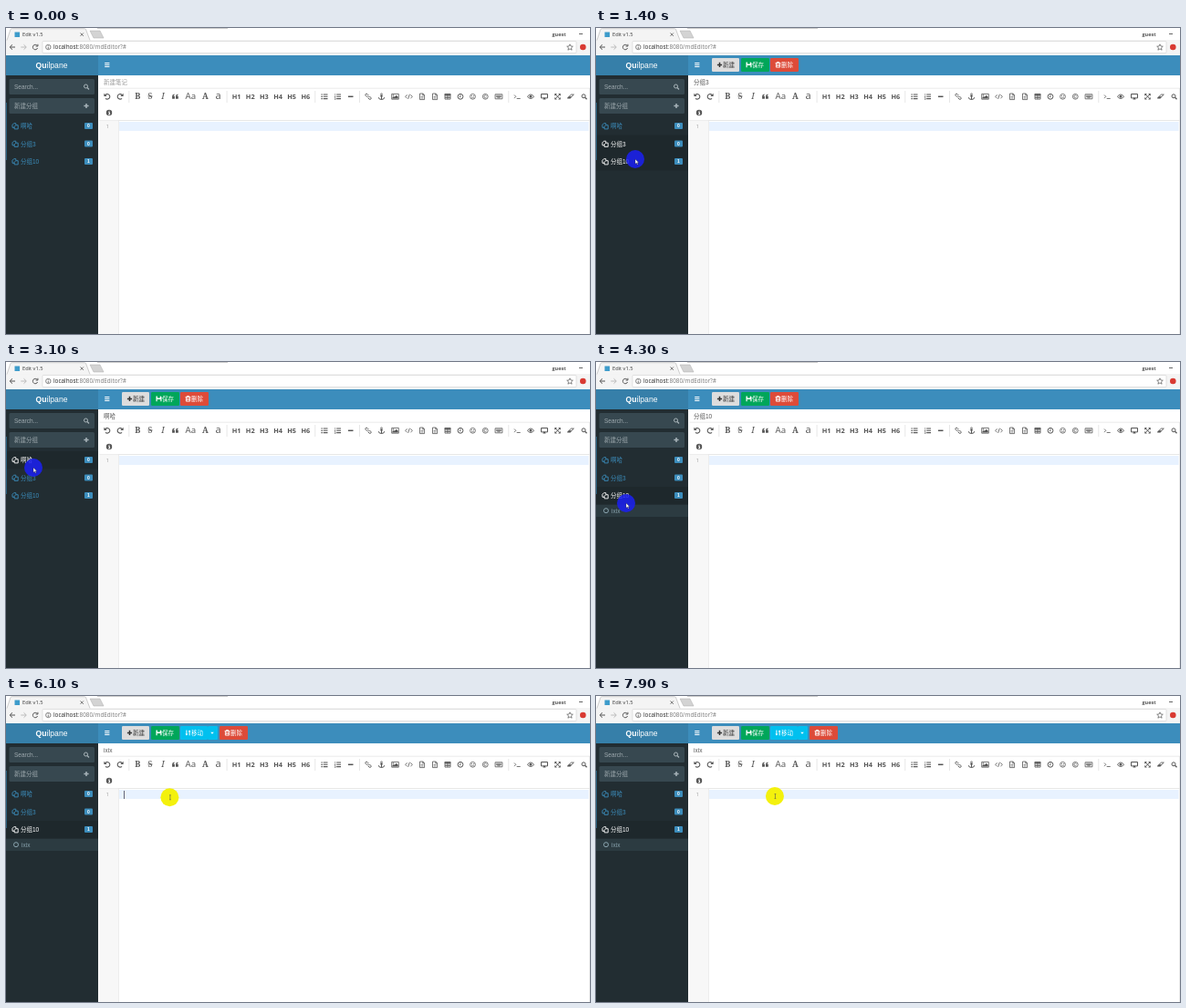
An HTML page for the animation above (8000 ms loop, 640 by 336 pixels).

```html
<!DOCTYPE html>
<html lang="zh-CN">
<head>
<meta charset="utf-8">
<title>Note editor</title>
<style>
html, body { margin: 0; width: 100%; height: 100%; overflow: hidden; background: #fff; }
svg { display: block; width: 100vw; height: 100vh; }
text { font-family: "Open Sans", "Noto Sans CJK SC", "Noto Sans CJK", sans-serif; font-size: 6.5px; }
.ui { font-family: "Liberation Sans", "Noto Sans CJK SC", "Noto Sans CJK", sans-serif; }
.serif { font-family: "Noto Serif", "Liberation Serif", serif; }
.mid { text-anchor: middle; }
.bold { font-weight: 700; }
.line { fill: none; stroke: currentColor; }
</style>
</head>
<body>
<svg id="stage" viewBox="0 0 640 336" xmlns="http://www.w3.org/2000/svg"></svg>
<script>
const LOOP = 8000, STEP = 100;
const TOP = 30, BODY = 52, SIDE = 101, ROW = 19.5;
const stage = document.getElementById('stage');

const rect = (x, y, w, h, fill, more = '') =>
  `<rect x="${x}" y="${y}" width="${w}" height="${h}" fill="${fill}" ${more}/>`;
const text = (x, y, str, fill, more = '') => `<text x="${x}" y="${y}" fill="${fill}" ${more}>${str}</text>`;
const stroke = (d, w = 1) => `<path class="line" d="${d}" stroke-width="${w}"/>`;
const solid = d => `<path d="${d}" fill="currentColor" fill-rule="evenodd"/>`;
const ring = (r, w = 1, x = 0, y = 0) =>
  `<circle class="line" cx="${x}" cy="${y}" r="${r}" stroke-width="${w}"/>`;
const dot = (r, x = 0, y = 0) => `<circle cx="${x}" cy="${y}" r="${r}" fill="currentColor"/>`;

const page = stroke('M-2.5,-3.3H1L2.6,-1.6V3.3H-2.5ZM.8,-3.3V-1.4H2.6', .8) + stroke('M-1.3,0H1.4M-1.3,1.7H1.4', .7);
const undo = stroke('M-2.4,-1.4A2.8 2.8 0 1 1 -2,2', 1.1) + solid('M-3.6,-3.6V-.4H-.4Z');
const bars = stroke('M-1.3,-2.3H3.5M-1.3,0H3.5M-1.3,2.3H3.5', 1.1);

const icons = {
  undo,
  redo: `<g transform="scale(-1 1)">${undo}</g>`,
  quote: solid('M-3.4,-.2Q-3.4,-2.6 -.9,-2.8V-1.8Q-2,-1.6 -1.9,-.6H-.6V2.4H-3.4ZM.5,-.2Q.5,-2.6 3,-2.8V-1.8Q1.9,-1.6 2,-.6H3.3V2.4H.5Z'),
  ul: bars + solid('M-3.6,-2.9h1.4v1.2h-1.4zM-3.6,-.6h1.4v1.2h-1.4zM-3.6,1.7h1.4v1.2h-1.4z'),
  ol: bars + stroke('M-2.8,-3.2V-1.6M-3.5,-.4H-2.4L-3.4,.8H-2.3M-3.4,1.8H-2.4V3.2H-3.4', .6),
  minus: stroke('M-2.8,0H2.8', 1.5),
  link: `<g transform="rotate(45)">${stroke('M-.7,-1.2H-2.7A1.2 1.2 0 0 0 -2.7,1.2H-.7M.7,-1.2H2.7A1.2 1.2 0 0 1 2.7,1.2H.7M-1.2,0H1.2', .9)}</g>`,
  anchor: ring(.9, .8, 0, -2.5) + stroke('M0,-1.6V3.2M-1.6,-.5H1.6M-3.3,.9Q-3,3.2 0,3.2Q3,3.2 3.3,.9', 1),
  image: stroke('M-3.8,-2.9H3.8V2.9H-3.8Z', .8) + solid('M-3.2,2.3V1.2L-1.6,-.4L-.7,.5L1.3,-1.5L3.2,.5V2.3Z') + dot(.7, -2.1, -1.4),
  code: stroke('M-2,-2L-3.8,0L-2,2M2,-2L3.8,0L2,2M.8,-2.6L-.8,2.6', .8),
  page,
  table: stroke('M-3,-2.8H3V2.8H-3ZM-3,-.5H3M-3,1.2H3M0,-2.6V2.8', .8) + solid('M-3.3,-3.1H3.3V-1.5H-3.3Z'),
  clock: ring(2.9) + stroke('M0,-1.8V.4H-1.3', .8),
  smile: ring(2.9, .8) + dot(.5, -1, -.9) + dot(.5, 1, -.9) + stroke('M-1.5,.7Q0,2.2 1.5,.7', .7),
  copyright: ring(2.9, .8) + stroke('M1.2,-.8A1.4 1.4 0 1 0 1.2,.8', .8),
  keys: stroke('M-3.9,-2.5H3.9V2.5H-3.9Z', .8) + stroke('M-2.8,-1.1H2.8M-2.8,.2H2.8', .8) + stroke('M-1.7,1.4H1.7', .7),
  terminal: stroke('M-3.5,-1.8L-1.7,0L-3.5,1.8M-.8,2.2H3.2', .8),
  eye: stroke('M-3.6,0Q0,-4.6 3.6,0Q0,4.4 -3.6,0Z', .9) + dot(1.4),
  desktop: stroke('M-3.5,-2.8H3.5V1.6H-3.5Z', 1) + solid('M-.8,1.5H.8L1.6,3.2H-1.6Z'),
  expand: stroke('M-2.4,-2.4L2.4,2.4M2.4,-2.4L-2.4,2.4', 1) +
    solid('M-3.2,-3.2h2.6l-2.6,2.6zM3.2,-3.2v2.6l-2.6,-2.6zM3.2,3.2h-2.6l2.6,-2.6zM-3.2,3.2v-2.6l2.6,2.6z'),
  eraser: stroke('M-3.4,1.6L.6,-2.2H3.5L-.4,1.6Z', .9) + solid('M-1.8,0H1.3L-.4,1.9H-3.5Z'),
  search: ring(2, 1, -.5, -.5) + stroke('M1,1L3,3', 1.3),
  info: dot(3.2) + '<path d="M-.8,-.4H.5V1.8M-1,1.8H1.2M-.3,-1.8H.5" stroke="#fff" fill="none"/>',
  plus: stroke('M-2.6,0H2.6M0,-2.6V2.6', 1.5),
  files: stroke('M-3,-1.4L-1.4,-3H.8V-1M-3,-1.4V1.6H-.8M-.8,.6L.8,-1H3.2V3.2H-.8Z', .9),
  save: solid('M-3,-2.9H2L3,-1.9V2.9H-3ZM-1.6,-2.9V-.8H1.3V-2.9ZM-1.8,.7V2.9H1.8V.7Z'),
  move: stroke('M-1.6,-2.9V2.2M1.6,-2.2V2.9', 1) + solid('M-3,1.2H-.2L-1.6,3.1ZM.2,-1.2H3L1.6,-3.1Z'),
  trash: stroke('M-2.9,-2H2.9M-1,-2V-3H1V-2M-2.1,-1.7V2.7H2.1V-1.7M-.7,-.8V1.8M.7,-.8V1.8', .9),
  menu: stroke('M-2.6,-2H2.6M-2.6,0H2.6M-2.6,2H2.6', 1)
};
const icon = (name, x, y, color) =>
  `<g transform="translate(${x} ${y})" color="${color}">${icons[name]}</g>`;

function browser() {
  return rect(0, 0, 640, TOP, '#fff') + rect(100, 0, 143, 1, '#ccc') + rect(0, 13, 640, TOP - 13, '#f4f4f4') +
    '<path d="M1,13.5L5,1.5Q5.5,.7 7,.7H85Q87,.7 87.5,1.5L92,13.5" fill="#f4f4f4" stroke="#bbb" stroke-width=".7"/>' +
    '<path d="M92,3H103L107,11H96Z" fill="#d3d3d3" stroke="#aaa" stroke-width=".5"/>' +
    rect(9.5, 4.5, 5.5, 5.5, '#3e9ccb') + text(18, 9.3, 'Edit v1.5', '#333', 'style="font-size:5.7px"') +
    '<path d="M81.5,5.5l3.4,3.4m0,-3.4l-3.4,3.4" stroke="#555" stroke-width=".8"/>' +
    text(606, 8.6, 'guest', '#555', 'class="mid bold" style="font-size:5.5px"') +
    rect(628, 6, 4, 1, '#666') +
    rect(40, 14.5, 585, 13, '#fff', 'rx="1" stroke="#d0d0d0" stroke-width=".6"') +
    '<g fill="none" stroke="#555" stroke-width="1"><path d="M10,21H4.5M7,18.3L4.2,21L7,23.7"/>' +
    '<path d="M16.3,21H22M19.5,18.3L22.3,21L19.5,23.7" stroke="#bbb"/>' +
    '<path d="M34.3,19.5A2.7 2.7 0 1 0 34.6,22M34.9,17.8V20H32.6"/>' +
    '<path d="M46.3,20.6V23M46.3,19V19.8" stroke-width=".8"/><circle cx="46.3" cy="21" r="2.7" stroke-width=".7"/>' +
    '<path d="M618,17.8l1,2.2 2.3,.2-1.8,1.6.6,2.4-2.1-1.3-2.1,1.3.6-2.4-1.8-1.6 2.3-.2z" stroke-width=".7"/></g>' +
    '<circle cx="632.3" cy="21" r="3.3" fill="#d93a32"/>' +
    '<text x="52" y="23.4" style="font-size:6.4px" fill="#777"><tspan fill="#222">localhost</tspan>:8080/mdEditor?#</text>';
}

function sidebar() {
  return rect(0, BODY, SIDE, 336 - BODY, '#222d32') + rect(0, TOP, SIDE, BODY - TOP, '#367fa9') +
    '<text class="ui mid" x="50" y="44" fill="#fff" style="font-size:8.6px"><tspan class="bold">Qu</tspan>ilpane</text>' +
    rect(3.5, 56, 93.5, 17, '#374850', 'rx="1.5"') + rect(3.5, 77, 93.5, 17, '#374850', 'rx="1.5"') +
    text(9, 66.8, 'Search...', '#a0abb0', 'class="ui"') + text(9, 87.7, '新建分组', '#a0abb0', 'class="ui"') +
    icon('search', 88, 64.5, '#a8b4b9') + icon('plus', 88, 85.5, '#a8b4b9');
}

const groups = [['啊哈', 98, 0], ['分组3', 117.5, 0], ['分组10', 137, 1]];
function groupRow([name, y, count], i) {
  return `<g id="group${i}">` + rect(0, y, SIDE, ROW, '#1e282c', 'class="back"') +
    icon('files', 10, y + 9.7, 'inherit') +
    text(16, y + 12.2, name, 'currentColor', 'class="ui"') +
    rect(86, y + 6, 9, 7, '#3c8dbc', 'rx="1"') +
    text(90.5, y + 11.4, count, '#fff', 'class="ui mid bold" style="font-size:5px"') + '</g>';
}

function note() {
  return `<clipPath id="slide"><rect id="slideBox" x="0" y="156.5" width="${SIDE}" height="13.5"/></clipPath>` +
    '<g id="note" clip-path="url(#slide)">' + rect(0, 156.5, SIDE, 13.5, '#2c3b41') +
    `<g transform="translate(11 163.2)">${ring(2.5)}</g>` +
    text(17, 165.5, 'ixix', 'currentColor', 'class="ui"') + '</g>';
}

function button(x, w, fill, color, name, label) {
  return rect(x, 33, w, 15, fill, 'rx="1.2"') + icon(name, x + 8.5, 40.4, color) +
    text(x + 12, 43, label, color, 'class="ui"');
}

function header() {
  return rect(SIDE, TOP, 640 - SIDE, BODY - TOP, '#3c8dbc') + icon('menu', 110.8, 40.5, '#fff') +
    '<g id="buttons">' + button(127, 30, '#ddd', '#333', 'plus', '新建') +
    button(159, 31, '#00a65a', '#fff', 'save', '保存') +
    '<g id="move">' + button(191, 30, '#00c0ef', '#fff', 'move', '移动') +
    rect(221, 33, 11, 15, '#00c0ef', 'rx="1.2"') +
    '<path d="M224.2,39.8h3.6l-1.8,1.9z" fill="#fff"/></g>' +
    '<g id="remove">' + button(191, 31, '#dd4b39', '#fff', 'trash', '删除') + '</g></g>';
}

function toolbar() {
  const ink = '#555', y = 75.3;
  const at = [['undo', 111], ['redo', 125], ['quote', 185.5], ['ul', 349], ['ol', 363.5], ['minus', 377.7],
    ['link', 397], ['anchor', 411.5], ['image', 426.5], ['code', 441.5], ['page', 456], ['page', 470],
    ['table', 484], ['clock', 498], ['smile', 511.5], ['copyright', 525.3], ['keys', 540], ['terminal', 560.5],
    ['eye', 575], ['desktop', 590], ['expand', 604.5], ['eraser', 618.8], ['search', 633.5]];
  const glyph = (x, s, size, kind, more = '') =>
    text(x, 78.3, s, ink, `class="mid ${kind}" style="font-size:${size}px;${more}"`);
  return at.map(([name, x]) => icon(name, x, y, ink)).join('') +
    glyph(144.3, 'B', 9, 'serif bold') + glyph(158, 'S', 9, 'serif', 'text-decoration:line-through') +
    glyph(172, 'I', 9.5, 'serif', 'font-style:italic') + glyph(202.3, 'Aa', 9.7, '') +
    glyph(218.5, 'A', 9, 'serif bold') + glyph(232.5, 'a', 11, '') +
    [1, 2, 3, 4, 5, 6].map(n => glyph(237.4 + 15.15 * n, 'H' + n, 7.3, 'bold')).join('') +
    [134.5, 241.7, 338.5, 387, 550.5].map(x => rect(x, 69, .7, 13, '#ddd')).join('') +
    icon('info', 113, 93, ink);
}

function editor() {
  return rect(SIDE, BODY, 640 - SIDE, 336 - BODY, '#fff') + rect(102, 65.8, 538, .7, '#e2e2e2') +
    '<text id="title" class="ui" x="107" y="61.5"></text>' + toolbar() +
    rect(102, 101, 538, .7, '#ddd') + rect(102, 101.7, 21.5, 234.3, '#f7f7f7') +
    rect(123.3, 101.7, .6, 234.3, '#e4e4e4') + rect(124, 103, 514.5, 10, '#e8f2ff') +
    text(111.3, 110.3, '1', '#999', 'class="mid" style="font-size:5.5px"') +
    rect(129, 104, 1, 9, '#667', 'id="caret"') + rect(639.3, 66, .7, 270, '#e2e2e2');
}

stage.innerHTML = browser() + editor() + header() + sidebar() + groups.map(groupRow).join('') + note() +
  rect(0, 82, .8, 63, '#2f6f94') +
  '<g id="mouse"><circle id="halo" r="10"/>' +
  '<path id="arrow" d="M0,0V5.2L1.3,4.1L2.2,6L3.1,5.6L2.2,3.8H3.8Z" fill="#fff" stroke="#222" stroke-width=".35"/>' +
  '<path id="beam" d="M-.4,-2.4H1.4M.5,-2.4V2.6M-.4,2.6H1.4" fill="none" stroke="#555" stroke-width=".6"/></g>';

const el = {};
stage.querySelectorAll('[id]').forEach(e => el[e.id] = e);
const show = (e, on) => e.setAttribute('visibility', on ? 'visible' : 'hidden');
const ease = p => p * p * (3 - 2 * p);
const clamp = p => Math.max(0, Math.min(1, p));

// time, x, y
const path = [[0, -14, 136], [100, -12, 136], [500, 38, 130], [800, 42, 129], [1400, 43, 144], [1800, 42, 142],
  [2200, 42, 141], [2900, 30, 117], [3100, 30, 116], [3300, 30, 116], [3900, 33, 153], [4300, 33, 155],
  [4700, 55, 160], [4900, 56.3, 159], [5700, 173, 113], [6100, 179.4, 111.2], [6400, 179.4, 111.2],
  [7300, 195, 110], [8000, 196, 110]];
function mouseAt(t) {
  const i = Math.max(1, path.findIndex(k => k[0] >= t));
  const [a, b] = [path[i - 1], path[i]];
  const p = ease(clamp((t - a[0]) / (b[0] - a[0])));
  return [a[1] + (b[1] - a[1]) * p, a[2] + (b[2] - a[2]) * p];
}

// time, title, active group
const states = [[0, '新建笔记', -1], [700, '分组3', 1], [2900, '啊哈', 0], [4000, '分组10', 2], [4800, 'ixix', 2]];

function draw(t) {
  const [since, title, active] = states.filter(s => s[0] <= t).pop();
  const [x, y] = mouseAt(t);
  const inSide = x < SIDE;
  const opened = title === 'ixix';

  el.title.textContent = title;
  el.title.setAttribute('fill', active < 0 ? '#999' : '#555');
  show(el.buttons, active >= 0);
  el.move.setAttribute('display', opened ? 'inline' : 'none');
  el.remove.setAttribute('transform', `translate(${opened ? 43 : 0} 0)`);

  groups.forEach(([, top], i) => {
    const hover = inSide && x > 0 && y >= top && y < top + ROW;
    const lit = i === active || (hover && active >= 0);
    const row = el['group' + i];
    row.setAttribute('color', lit ? '#fff' : '#3c8dbc');
    row.querySelectorAll('.back').forEach(b => show(b, lit));
  });

  el.slideBox.setAttribute('height', 13.5 * ease(clamp((t - 3900) / 400)));
  const overNote = t > 4000 && inSide && y > 156.5;
  el.note.setAttribute('color', overNote ? '#fff' : '#8aa4af');
  el.note.setAttribute('font-weight', overNote ? 700 : 400);

  show(el.caret, opened && Math.floor((t - since) / 530) % 2 === 0);
  show(el.mouse, t >= 100);
  el.mouse.setAttribute('transform', `translate(${x} ${y})`);
  el.halo.setAttribute('fill', inSide ? '#1b20f4' : '#f3f000');
  el.halo.setAttribute('opacity', inSide ? .85 : .95);
  el.arrow.setAttribute('display', inSide ? 'inline' : 'none');
  el.beam.setAttribute('display', inSide ? 'none' : 'inline');
}

const start = performance.now();
function tick() {
  const t = (performance.now() - start) % LOOP;
  draw(Math.floor(t / STEP) * STEP);
  requestAnimationFrame(tick);
}
tick();
</script>
</body>
</html>
```
